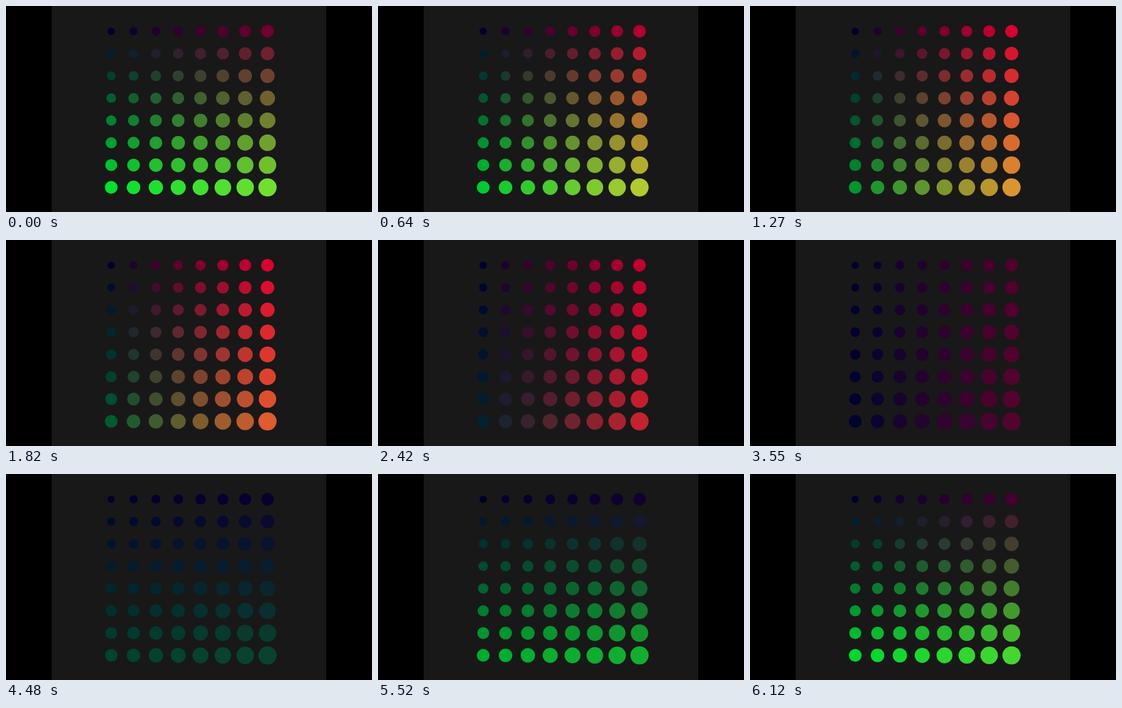
These frames come from a looping animation (600x338 px, 6180 ms). An HTML page with a canvas:

```html
<!DOCTYPE html>
<html lang="en">
<head>
<meta charset="utf-8">
<title>Colour dots</title>
<style>
  html, body { margin: 0; width: 100%; height: 100%; overflow: hidden; background: #000; }
  canvas { display: block; }
</style>
</head>
<body>
<canvas id="stage" width="600" height="338"></canvas>
<script>
  const ctx = document.getElementById('stage').getContext('2d');
  const LOOP = 6180;
  const SPEED = 0.00096; // radians per ms; the loop cuts before a full turn
  const COUNT = 8;
  const LEFT = 172.5, TOP = 41.4, GAP = 36.6;
  const BLUE = 46;

  function draw(t) {
    const phase = t * SPEED;
    const red = 16 * (1 + Math.sin(phase));
    const green = 16 * (1 + Math.cos(phase));

    ctx.fillStyle = '#000';
    ctx.fillRect(0, 0, 600, 338);
    ctx.fillStyle = '#181818';
    ctx.fillRect(75, 0, 450, 338);

    for (let row = 0; row < COUNT; row++) {
      for (let col = 0; col < COUNT; col++) {
        const radius = 6 + 0.64 * (col + row);
        ctx.fillStyle = `rgb(${Math.round(col * red)}, ${Math.round(row * green)}, ${BLUE})`;
        ctx.beginPath();
        ctx.arc(LEFT + col * GAP, TOP + row * GAP, radius, 0, Math.PI * 2);
        ctx.fill();
      }
    }
  }

  const start = performance.now();
  function tick() {
    draw((performance.now() - start) % LOOP);
    requestAnimationFrame(tick);
  }
  tick();
</script>
</body>
</html>
```
